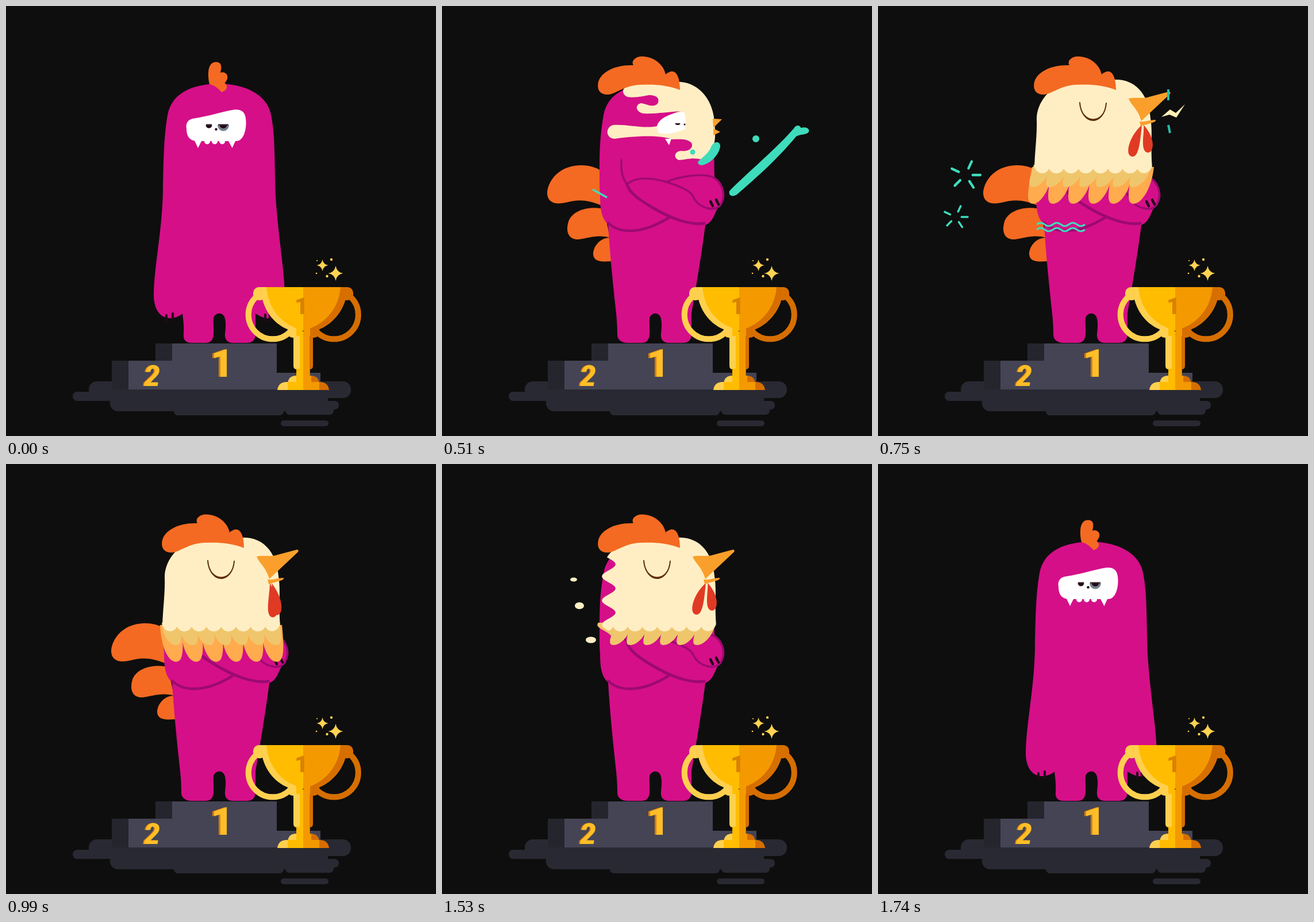
Recreate the animation shown at these times as an HTML page with a canvas. Size 748 by 748 pixels, loop 1.98 s.

```html
<!DOCTYPE html>
<html lang="en">
<head>
<meta charset="utf-8">
<title>Podium</title>
<style>
html, body { margin: 0; width: 100%; height: 100%; overflow: hidden; background: #0e0e0e; }
canvas { display: block; width: 748px; height: 748px; }
</style>
</head>
<body>
<canvas id="stage" width="748" height="748"></canvas>
<script>
const g = document.getElementById('stage').getContext('2d');
const LOOP = 1980, STEP = 30;
const PINK = '#d50f88', PLUM = '#9c0a72', INK = '#22091a', CREAM = '#ffeec4';
const ORANGE = '#f46a22', TEAL = '#3edcbc', RED = '#e03a24', BEAK = '#fa9f2b';
const GOLD = { pale: '#ffd04f', main: '#ffbc00', deep: '#f49a00', dark: '#d66e00' };

const LEGS = 'L434 570 C434 582 428 586 418 586 L395 586 C385 586 380 580 381 570 ' +
  'C383 555 382 545 380 541 C376 532 364 533 361 543 C360 553 362 562 361 572 ' +
  'C360 582 355 586 347 586 L323 586 C312 586 ';
const BODY = {
  rest: 'M371 135 C418 136 452 155 460 185 C470 225 466 290 470 345 C475 410 484 460 485 500 ' +
    'C486 530 472 545 452 543 C445 542 438 537 434 535 ' + LEGS + '308 580 309 570 C310 555 308 545 307 535 ' +
    'C300 541 292 543 285 543 C270 543 257 530 257 502 C258 450 272 390 273 320 ' +
    'C274 260 275 225 281 190 C288 152 322 136 371 135Z',
  lean: 'M371 135 C418 136 452 155 464 190 C473 230 473 310 475 370 C474 420 465 460 448 500 ' +
    'C442 510 440 515 436 520 C435 525 434 530 434 535 ' + LEGS + '308 580 308 570 C307 555 305 540 303 520 ' +
    'C295 518 285 513 278 508 C262 497 258 480 258 460 C260 410 268 380 270 320 ' +
    'C273 250 275 225 281 190 C288 152 322 136 371 135Z',
  crossed: 'M371 135 C418 136 455 150 467 185 C475 225 473 270 474 298 C489 305 495 328 484 346 ' +
    'C474 356 474 375 458 381 C452 430 440 500 434 535 ' + LEGS + '304 580 305 570 C305 555 304 545 303 535 ' +
    'C297 480 292 430 289 380 C278 370 275 355 275 330 C274 320 274 305 274 290 ' +
    'C274 250 275 225 281 190 C288 152 322 136 371 135Z'
};
const CREST = {
  rest: 'M354 136 C350 118 351 99 364 97.5 C377 97 375 108 373 116 C380 113 387 119 385 126 ' +
    'C384 131 380 133 381 135 C386 138 386 146 375 150 C371 145 362 137 354 136Z',
  lean: 'M381 135 C388 125 400 108 399 97 C396 86 378 86 372 98 C368 106 368 111 367 114 ' +
    'C362 106 350 110 351 120 C351 125 354 128 354 129 C345 128 340 140 346 148 ' +
    'C350 153 354 154 357 153 C360 146 367 137 381 135Z'
};
const COMB = 'M414 146 C414 125 408 112 398 114 C394 115 391 117 389 119 C386 104 372 90 352 88 ' +
  'C338 86 328 95 333 103 C300 102 277 115 272 132 C268 150 280 155 290 154 ' +
  'C304 152 318 138 345 137 C370 136 390 137 414 146Z';
const TAIL = 'M274 285 C255 274 225 274 205 288 C190 298 183 315 183 325 C183 342 197 346 215 342 ' +
  'C235 337 250 335 280 348Z M282 353 C250 347 226 358 220 375 C214 395 222 407 238 406 ' +
  'C255 404 270 397 292 403Z M292 403 C275 403 263 418 263 432 C264 446 280 445 296 444Z';
const GOO = 'M318 142 C330 134 380 134 414 132 C448 134 473 165 474 205 C477 230 475 255 455 268 ' +
  'C435 262 425 268 412 268 C402 264 404 253 416 252 C430 254 438 246 434 238 C426 230 412 232 400 232 ' +
  'C375 222 320 228 300 231 C284 230 284 210 298 207 C320 205 350 214 374 209 C376 198 395 188 415 183 ' +
  'C395 184 370 188 350 187 C337 184 335 172 346 169 C356 170 366 178 375 170 ' +
  'C380 160 372 155 360 155 C345 158 330 160 322 158 C314 154 313 146 318 142Z';
const SPLASH = 'M500 322 C520 300 580 250 612 213 C616 205 624 208 624 212 C632 210 640 212 638 219 ' +
  'C634 225 624 222 616 227 C580 270 545 300 513 328 C505 333 498 330 500 322Z';

const clamp = v => Math.max(0, Math.min(1, v));
const span = (t, a, b) => clamp((t - a) / (b - a));
const ease = k => k * k * (3 - 2 * k);
const lerp = (a, b, k) => a + (b - a) * k;
const NUM = /-?\d+(\.\d+)?/g;

function mix(a, b, k) {
  const end = b.match(NUM);
  let i = 0;
  return a.replace(NUM, n => lerp(+n, +end[i++], k));
}
function fill(d, color) {
  g.fillStyle = color;
  g.fill(typeof d === 'string' ? new Path2D(d) : d);
}
function line(d, color, width, cap = 'round') {
  g.strokeStyle = color;
  g.lineWidth = width;
  g.lineCap = cap;
  g.lineJoin = 'round';
  g.stroke(new Path2D(d));
}
function rect(x, y, x2, y2, color, r = 0) {
  g.fillStyle = color;
  g.beginPath();
  g.roundRect(x, y, x2 - x, y2 - y, r);
  g.fill();
}
function oval(x, y, rx, color, ry = rx, from = 0, to = 7) {
  g.fillStyle = color;
  g.beginPath();
  g.ellipse(x, y, rx, ry, 0, from, Math.min(to, Math.PI * 2));
  g.fill();
}
function scaled(x, y, k, draw) {
  if (k <= 0) return;
  g.save();
  g.translate(x, y);
  g.scale(k, k);
  g.translate(-x, -y);
  draw();
  g.restore();
}
function digit(s, x, y, size, color, style = '') {
  g.font = `${style} 900 ${size}px Roboto, "Liberation Sans", sans-serif`;
  g.textAlign = 'center';
  g.fillStyle = color;
  g.fillText(s, x, y);
}

function podium() {
  const floor = '#292933', face = '#444454', side = '#25252e';
  rect(144, 653, 600, 682, floor, 14);
  rect(116, 671, 300, 687, floor, 8);
  rect(181, 660, 560, 705, floor, 14);
  rect(292, 685, 483, 712, floor, 7);
  rect(486, 690, 570, 711, floor, 7);
  rect(470, 687, 579, 702, floor, 7);
  rect(478, 721, 561, 731, floor, 5);
  rect(184, 617, 214, 667, side);
  rect(260, 587, 290, 617, side);
  rect(213, 617, 290, 667, face);
  rect(289, 587, 471, 667, face);
  rect(471, 638, 547, 667, face);
  digit('1', 373, 645, 67.5, '#d67a0c');
  digit('1', 376, 645, 67.5, '#ffbe27');
  digit('2', 252, 661, 49, '#d67a0c', 'italic');
  digit('2', 254, 661, 49, '#ffbe27', 'italic');
}

// Splits a golden shape into vertical bands of tone.
function bands(d, cuts) {
  g.save();
  g.clip(new Path2D(d));
  Object.values(GOLD).forEach((c, i) => rect(cuts[i], 480, cuts[i + 1], 680, c));
  g.restore();
}
function star(x, y, r) {
  const q = r * 0.14;
  fill(`M${x} ${y - r} Q${x + q} ${y - q} ${x + r} ${y} Q${x + q} ${y + q} ${x} ${y + r} ` +
    `Q${x - q} ${y + q} ${x - r} ${y} Q${x - q} ${y - q} ${x} ${y - r}Z`, '#ffd352');
}
function trophy() {
  [[464, GOLD.pale], [570.5, GOLD.dark]].forEach(([x, c]) => {
    g.beginPath();
    g.arc(x, 537, 42.3, 0, 7);
    g.lineWidth = 10;
    g.strokeStyle = c;
    g.stroke();
  });
  rect(430, 489, 452, 512, GOLD.pale, 10);
  rect(582, 489, 604, 512, GOLD.dark, 10);
  bands('M440 489 H594 C592 530 566 556 538 565 H497 C468 556 445 530 443 489Z', [430, 431, 517, 518, 610]);
  g.save();
  g.clip(new Path2D('M440 489 H594 C592 530 566 556 538 565 H497 C468 556 445 530 443 489Z'));
  fill('M430 489 H453 C456 525 476 548 503 560 L490 570 H430Z', GOLD.pale);
  rect(517, 489, 600, 566, GOLD.deep);
  fill('M606 489 H582 C579 525 558 548 532 560 L545 570 H606Z', GOLD.dark);
  g.restore();
  bands('M497 557 L517 566 L538 557 C548 558 549 576 536 577 H499 C486 576 487 558 497 557Z', [480, 505, 517, 529, 560]);
  bands('M500 574 H534 V626 Q534 632 528 632 H506 Q500 632 500 626Z', [500, 511, 517, 528, 534]);
  bands('M505 631 H529 V646 H505Z', [500, 505, 517, 528, 534]);
  bands('M490 657 Q491 643 505 643 H530 Q544 643 545 657Z', [480, 505, 517, 531, 560]);
  bands('M472 668 Q474 654 488 654 H546 Q560 654 562 668Z', [470, 490, 517, 545, 565]);
  digit('1', 514, 536, 41, '#d98200');
  star(550.5, 451, 10);
  star(573.5, 465, 13);
  [[566, 441, 2.2], [541, 443, 1.1], [540, 465, 1.3], [558.5, 470, 2.2]].forEach(p => oval(...p, '#ffd352'));
}

function mask(dx) {
  g.save();
  g.translate(dx, dx ? 1 : 0);
  fill('M314 214 C312 203 317 197 327 195.5 C352 192 378 183 396 180.5 C411 179 417 185 417.5 201 ' +
    'C418 215 414 231 404 234.5 L399 235 L393.5 247 L387 235 H340 L334 247 L328 234.5 C319 233 314 226 314 214Z', '#fff');
  [350, 363, 376].forEach(x => oval(x, 235.5, 5, '#fff'));
  oval(353, 207, 5.5, INK, 5.5, 0, Math.PI);
  oval(378, 207, 10, '#72828a', 10.5, 0, Math.PI);
  oval(378, 207, 6.5, INK, 6, 0, Math.PI);
  line('M348 206.5 H358 M369 206.5 H387', '#3a2a30', 1.8, 'butt');
  oval(365.5, 214.5, 2.2, INK);
  g.restore();
}
function profile() {
  fill('M374 211 C375 196 395 187 421 184 C425 195 425 208 422 215 C405 220 390 226 376 220Z', '#fff');
  fill('M388 231 L399 231 L395 242Z', '#fff');
  oval(410, 204, 4.5, INK, 3, 0, Math.PI);
  oval(422, 206, 1.6, INK);
}
function restArms() {
  line('M279 538 V548 M290 535 V546 M451 537 V548 M459 534 V546', INK, 4);
}
function leanArms() {
  fill('M306 340 C302 400 310 445 318 470 C323 490 318 508 305 518 L303 523 C320 520 327 500 324 478 ' +
    'C320 455 306 420 306 340Z', PLUM);
  fill('M437 355 C436 400 425 420 402 438 C375 455 369 475 372 495 C376 512 400 518 425 518 L425 513 ' +
    'C395 513 378 505 377 490 C376 470 390 455 408 441 C432 422 437 395 437 355Z', PLUM);
  line('M295 513 L298 518 M304 507 L309 514 M375 494 L384 490 M377 504 L387 500', INK, 4.5);
}
function crossedArms() {
  line('M312 268 C311 288 314 300 322 310 C340 295 370 300 390 306 C412 313 430 320 436 330 C442 343 450 349 463 352', PLUM, 3.5);
  line('M390 306 C420 294 460 290 475 300 C490 312 493 330 486 343 C483 351 472 355 463 352', PLUM, 3.5);
  line('M322 310 C325 325 345 338 365 350 C395 368 430 382 456 378', PLUM, 5);
  line('M289 377 C310 398 350 396 395 368', PLUM, 4.5);
  line('M467 340 L471 348 M477 337 L481 345', INK, 4.5);
}
function swingArms(k) {
  const arm = (a, b) => {
    const d = mix(a, b, k);
    line(d, PLUM, 44);
    line(d, PINK, 37);
  };
  arm('M448 420 Q430 450 395 488', 'M448 345 Q390 360 310 360');
  arm('M287 430 Q280 470 302 495', 'M300 345 Q390 350 464 325');
}

// Keeps only what lies to the right of a ragged edge.
function raggedClip(front) {
  g.beginPath();
  g.moveTo(560, 80);
  for (let y = 80; y <= 360; y += 3) g.lineTo(front + 12 * Math.sin((y - 206) / 42 * Math.PI * 2), y);
  g.lineTo(560, 360);
  g.clip();
}
function feathers(x0, x1, n, y, tip, dx, color) {
  const w = (x1 - x0) / n;
  for (let i = 0; i < n; i++) {
    const x = x0 + i * w, c = x + w / 2 + dx, h = tip - y;
    fill(`M${x - 1} ${y} C${x - 2 + dx * .3} ${y + h * .6} ${c - w * .4} ${tip} ${c} ${tip} ` +
      `C${c + w * .4} ${tip} ${x + w + 2 + dx * .3} ${y + h * .6} ${x + w + 1} ${y}Z`, color);
  }
}
function hen(front, sweep, yellow, orange) {
  g.save();
  raggedClip(front - 8);
  if (orange > 0) feathers(269, 479, 6, 280, lerp(285, 344, orange), sweep, '#ffab4e');
  if (yellow > 0) feathers(272, 475, 7, 276, lerp(282, 315, yellow), sweep, '#f0c66c');
  g.restore();
  g.save();
  raggedClip(front);
  let d = 'M272 280';
  for (let i = 0; i < 8; i++) {
    const x = 272 + i * 25.6;
    d += ` C${x + 5} 294 ${x + 20} 294 ${x + 25.6} ${i < 7 ? 283 : 279}`;
  }
  fill(d + ' C474 240 478 220 474 195 C470 150 445 128 414 128 C385 135 340 134 318 138 ' +
    'C295 145 277 170 276 195 C277 225 273 250 272 280Z', CREAM);
  g.restore();
}
function henFace(sway, k) {
  const drop = (x, y, ex, ey) => {
    fill(`M${x} ${y} C${ex - 6} ${ey - 36} ${ex - 15} ${ey - 2} ${ex - 1} ${ey} C${ex + 11} ${ey + 1} ${ex + 13} ${ey - 26} ${x} ${y}Z`, RED);
  };
  fill('M350 166 C353 211 395 211 397.5 168 C394 205 355 207 350 166Z', '#5f2f0e');
  line('M351 168 C354 208 394 208 397 169', '#5f2f0e', 2);
  scaled(458, 190, k, () => {
    drop(459, 207, lerp(457, 443, sway), lerp(265, 262, sway));
    drop(462, 207, lerp(471, 470, sway), lerp(260, 255, sway));
    fill('M436 161 C447 158 462 162 472 158 L506 149 Q510 149 508 153 L458 200 C453 180 439 171 436 161Z', BEAK);
    fill('M455 201 C465 202 474 198 483 198 Q484 201 477 203 L457 209Z', BEAK);
  });
}
function burst(x, y, r, k) {
  if (k <= 0 || k >= 1.6) return;
  const a = r * k, b = r * Math.max(0, k - .55) * 1.1;
  [-155, -65, 0, 57, 135].forEach(deg => {
    const c = Math.cos(deg * Math.PI / 180), s = Math.sin(deg * Math.PI / 180);
    line(`M${x + c * b} ${y + s * b} L${x + c * a} ${y + s * a}`, TEAL, r / 6);
  });
}
function marks(t) {
  if (t < 630 || t >= 990) return;
  const k = t < 750 ? span(t, 600, 750) : 1 + span(t, 780, 960) * .6;
  burst(152, 294, 26, k);
  burst(135, 367, 21, k);
  if (t >= 690 && t < 900) {
    const cut = span(t, 810, 900) * 85;
    [380, 389].forEach(y => {
      let d = '';
      for (let x = 276 + cut; x <= 361; x += 2)
        d += `${d ? 'L' : 'M'}${x} ${y + 2.8 * Math.sin((x - 276) / 28 * Math.PI * 2 + Math.PI)} `;
      if (d) line(d, TEAL, 3.2, 'butt');
    });
    const s = span(t, 780, 900);
    line(`M505 ${145 - s * 16} V${164 - s * 24} M${505 + s * 4} ${207 + s * 12} L508 221`, '#2bbca6', 4, 'butt');
  }
  if (t >= 690) {
    const s = span(t, 780, 960);
    g.save();
    g.translate(s * 72, -s * 60);
    fill('M493 193 L508 180 L518 186 L534 171 L519 194 L507 189Z', '#fff0b4');
    g.restore();
  }
}
function spray(t) {
  if (t < 480 || t >= 600) return;
  const away = span(t, 510, 600), grow = t < 510 ? .6 : 1 - away;
  g.save();
  g.translate(away * 30, -away * 30);
  scaled(500 + away * 130, 325 - away * 110, grow, () => fill(SPLASH, TEAL));
  oval(546, 231, 6 * grow, TEAL);
  g.restore();
  scaled(465, 258, grow, () => fill('M446 270 C455 262 465 255 469 243 C475 234 484 236 484 244 ' +
    'C482 260 465 275 452 277 C446 277 444 273 446 270Z', TEAL));
  oval(436, 254, 4.5 * grow, TEAL);
  if (t >= 510) line(`M${262 - away * 30} ${319 - away * 17} L${287 - away * 50} ${333 - away * 28}`, TEAL, 3.5, 'butt');
}

function monster(t) {
  const away = t < 300 || t >= 1740;
  const shed = t >= 1440;
  if (away) {
    fill(BODY.rest, PINK);
    restArms();
    mask(0);
    fill(CREST.rest, ORANGE);
    return;
  }
  const arms = t < 1440 ? ease(span(t, 300, 450)) : 1 - ease(span(t, 1590, 1740));
  const tail = t < 1440 ? ease(span(t, 420, 510)) : 1 - span(t, 1440, 1530);
  scaled(285, 350, tail, () => fill(TAIL, ORANGE));
  fill(mix(shed ? BODY.rest : BODY.lean, BODY.crossed, arms), PINK);
  if (arms === 0) leanArms();
  else if (arms === 1) crossedArms();
  else swingArms(arms);

  if (t < 450) mask(lerp(-9.5, 14, arms));
  else if (t >= 1620) mask(0);
  else if (t < 600) {
    scaled(450, 180, lerp(.4, 1, span(t, 450, 510)), () => fill(GOO, CREAM));
    profile();
    if (t >= 510) fill('M471 196 L487 197 L479 205 L472 212Z M472 213 L484 219 L472 225Z', BEAK);
  }
  if (t >= 540 && t < 1620) {
    const front = shed ? lerp(250, 290, span(t, 1470, 1530)) + span(t, 1530, 1620) * 200
      : lerp(350, 245, span(t, 540, 600));
    const u = span(t, 840, 1230);
    const sway = shed ? span(t, 1410, 1500) : (1 - u) * Math.cos(u * Math.PI * 3);
    hen(front, sway * -17, span(t, 540, 630), shed ? 1 - span(t, 1440, 1530) : span(t, 600, 690));
    if (t >= 570 && t < 1590) henFace(sway, t < 660 ? lerp(.4, 1, span(t, 570, 660)) : 1);
  }

  if (t < 420) fill(CREST.lean, ORANGE);
  else if (t >= 1650) fill(CREST.rest, ORANGE);
  else {
    const k = shed ? 1 - .6 * span(t, 1560, 1650) : lerp(.4, 1, ease(span(t, 420, 510)));
    scaled(385, 138, k, () => fill(COMB, ORANGE));
  }
  if (t >= 1500 && t < 1620) {
    const s = (t - 1530) * -.6, k = 1 - span(t, 1530, 1650);
    [[229, 201, 6, 3.5], [239, 246.5, 8, 6], [259, 306, 9, 5.5]].forEach(([x, y, rx, ry]) =>
      oval(x + s, y, rx * k, CREAM, ry * k));
  }
  spray(t);
  marks(t);
}

function frame(now) {
  const t = Math.floor((now % LOOP) / STEP) * STEP;
  g.fillStyle = '#0e0e0e';
  g.fillRect(0, 0, 748, 748);
  podium();
  monster(t);
  trophy();
}
const start = performance.now();
function tick() {
  frame(performance.now() - start);
  requestAnimationFrame(tick);
}
tick();
</script>
</body>
</html>
```
